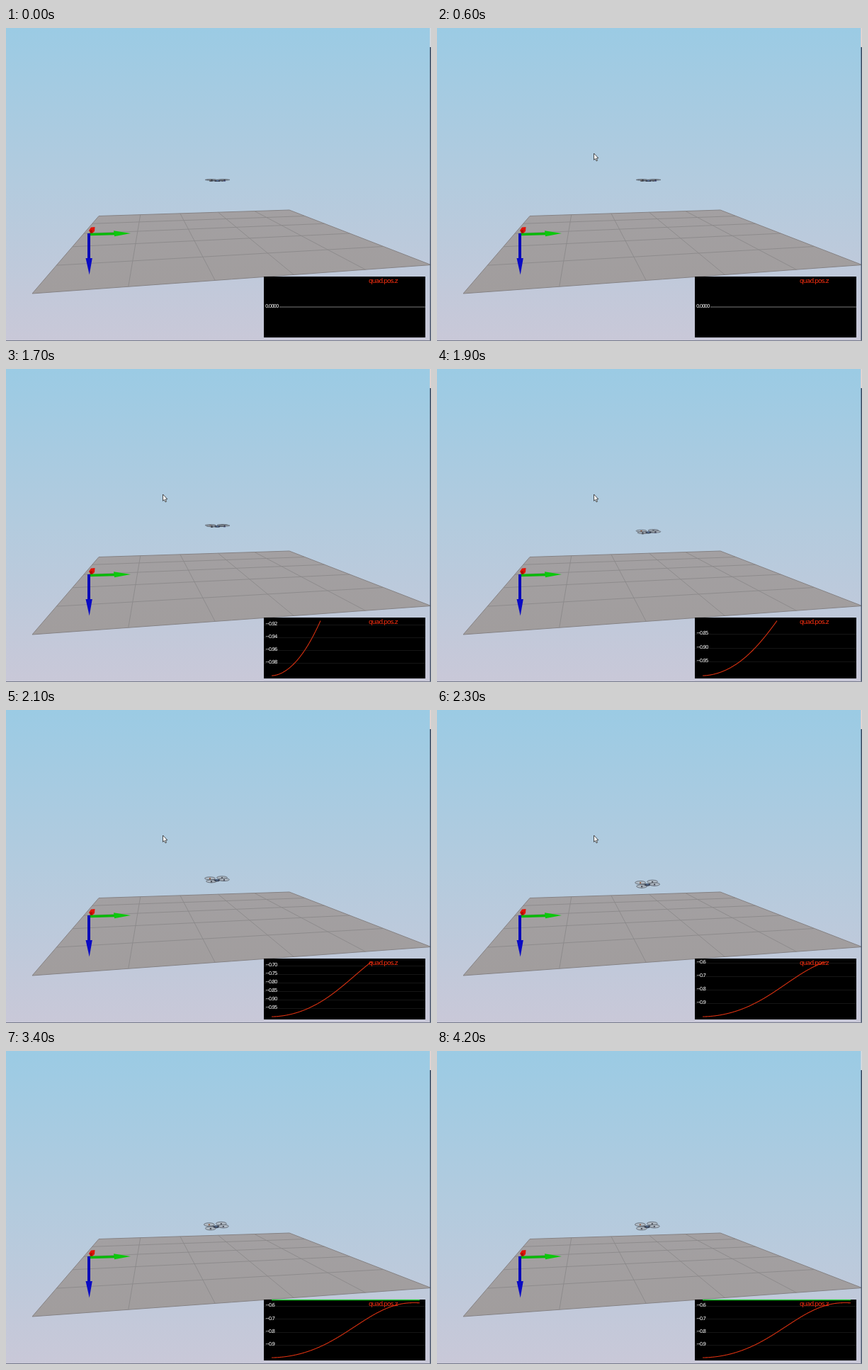
Animation, 600 px wide and 442 px high, one loop 4300 ms. Source, as an HTML page with a canvas:

```html
<!DOCTYPE html>
<html lang="en">
<head>
<meta charset="utf-8">
<title>Quadrotor altitude</title>
<style>
html, body { margin: 0; width: 100%; height: 100%; overflow: hidden; }
canvas { display: block; width: 600px; height: 442px; }
</style>
</head>
<body>
<canvas id="stage" width="600" height="442"></canvas>
<script>
const ctx = document.getElementById('stage').getContext('2d');
const LOOP = 4300;
const PLOT = { x: 364, y: 351, w: 228, h: 86, left: 375, base: 433, peak: 355.5 };
const TOP_RISE = 0.4266;

function poly(points, fill, stroke, width = 1) {
  ctx.beginPath();
  points.forEach(([x, y]) => ctx.lineTo(x, y));
  ctx.closePath();
  if (fill) { ctx.fillStyle = fill; ctx.fill(); }
  if (stroke) { ctx.strokeStyle = stroke; ctx.lineWidth = width; ctx.stroke(); }
}

function line(points, color, width = 1) {
  ctx.beginPath();
  points.forEach(([x, y]) => ctx.lineTo(x, y));
  ctx.strokeStyle = color;
  ctx.lineWidth = width;
  ctx.stroke();
}

function rect(x, y, w, h, fill) {
  ctx.fillStyle = fill;
  ctx.fillRect(x, y, w, h);
}

function oval(x, y, rx, ry, fill, stroke) {
  ctx.beginPath();
  ctx.ellipse(x, y, rx, ry, 0, 0, Math.PI * 2);
  ctx.fillStyle = fill;
  ctx.fill();
  if (stroke) { ctx.strokeStyle = stroke; ctx.lineWidth = 0.8; ctx.stroke(); }
}

function text(str, x, y, size, spacing, color) {
  ctx.font = `${size}px "DejaVu Sans", sans-serif`;
  ctx.letterSpacing = spacing + 'px';
  ctx.textBaseline = 'alphabetic';
  ctx.fillStyle = color;
  ctx.fillText(str, x, y);
}

function fade(y0, y1, ...colors) {
  const g = ctx.createLinearGradient(0, y0, 0, y1);
  colors.forEach((c, i) => g.addColorStop(i / (colors.length - 1), c));
  return g;
}

// Perspective map of the unit square onto the floor
function floorPoint(u, v) {
  const corners = [[131, 265.5, 1], [400, 257, 1.118], [600, 334.5, 0.554], [37, 375, 0.436]];
  const share = [(1 - u) * (1 - v), u * (1 - v), u * v, (1 - u) * v];
  let x = 0, y = 0, sum = 0;
  corners.forEach(([cx, cy, w], i) => {
    const k = w * share[i];
    x += cx * k;
    y += cy * k;
    sum += k;
  });
  return [x / sum, y / sum];
}

function drawScene() {
  rect(0, 0, 600, 442, fade(0, 442, '#9bcbe4', '#b3cbde', '#c9c8d8'));
  const floor = [[0, 0], [1, 0], [1, 1], [0, 1]].map(p => floorPoint(...p));
  poly(floor, fade(257, 375, '#a3a0a2', '#a19d9d'), '#858284');
  for (let i = 1; i < 5; i++) {
    line([floorPoint(i / 5, 0), floorPoint(i / 5, 1)], '#8c898b', 0.9);
    line([floorPoint(0, i / 5), floorPoint(1, i / 5)], '#8c898b', 0.9);
  }
}

function drawAxes() {
  poly([[117, 286], [120, 281.5], [125.5, 281], [125, 287], [121, 291]], '#e01408');
  poly([[118, 286], [122, 285], [122, 290], [119, 290]], '#b00c06');
  line([[117, 291.5], [154, 290.5]], '#08b808', 3.4);
  poly([[152, 286.3], [176, 290], [153, 294.3]], '#0cc80c');
  line([[117, 290], [117, 327]], '#0808b8', 4);
  poly([[112.5, 325], [121.8, 325], [117.7, 348.5]], '#0a0ac4');
}

function drawDrone(rise) {
  const k = rise / TOP_RISE;
  const cx = 298.5 - 1.7 * k ** 4;
  const cy = 215 + 76 * rise;
  const rotors = [[-10, -2.2], [7, -3.6], [-8, 3.2], [10, 0.2]]
    .map(([dx, dy]) => [cx + dx, cy + dy * k - 0.6 * (1 - k)]);
  rotors.forEach(([x, y]) => line([[cx, cy + 0.8], [x, y + 1]], '#4a505c', 1.3));
  rotors.forEach(([x, y], i) => {
    rect(x - 1.3, y + 0.2, 2.6, 2, i === 3 ? '#30306c' : '#30343c');
    oval(x, y, 7.4, 0.6 + 1.8 * k, 'rgba(176,184,192,.8)', '#5a616b');
    rect(x - 1, y - 0.6, 2, 1.6, i ? '#3a3e48' : '#8a5030');
  });
  oval(cx, cy + 0.9, 4, 1.2 + k * 0.8, '#3c4454');
  rect(cx - 1.5, cy, 3, 1.2, '#5574a0');
}

function riseAt(x) {
  const u = (x - PLOT.left) / 201;
  const w = u * (1 - 0.56 * u ** 0.55 * (1 - u) ** 2);
  return TOP_RISE * Math.sin(Math.PI / 2 * w) ** 2;
}

// Right end of the plotted curve at each tick of 100 ms
function traceEnd(n) {
  if (n < 14) return PLOT.left;
  if (n < 17) return 386 + 58 / 3 * (n - 14);
  if (n < 21) return 444 + 18 * (n - 17);
  return Math.min(584, 516 + 17 * (n - 21));
}

function tickStep(range) {
  for (let e = -5; e < 1; e++) {
    for (const m of [1, 2, 5]) {
      if (range / (m * 10 ** e) <= 7) return { step: m * 10 ** e, digits: -e };
    }
  }
}

function drawPlot(end) {
  const { x, y, w, h, left, base, peak } = PLOT;
  rect(x, y, w, h, '#000');
  ctx.save();
  ctx.beginPath();
  ctx.rect(x, y - 0.5, w, h);
  ctx.clip();
  if (end === left) {
    line([[386, 394], [x + w, 394]], '#7c7c7c');
    text('0.0000', 366, 394.7, 7, -1, '#fff');
  } else {
    const points = [];
    for (let px = left; px < end; px += 0.5) points.push([px, riseAt(px)]);
    points.push([end, riseAt(end)]);
    const max = Math.max(...points.map(p => p[1]));
    const scale = (base - peak) / max;
    const { step, digits } = tickStep(max);
    for (let i = 1; i * step <= max; i++) {
      const ty = base - i * step * scale;
      line([[x, Math.round(ty) + 0.5], [x + w, Math.round(ty) + 0.5]], '#151515');
      text('\u2212' + (1 - i * step).toFixed(digits), 366, ty + 1.1, 7, -1, '#fff');
    }
    const goal = base - 0.449 * scale;
    line([[left, goal], [end, goal]], '#18c828', 1.4);
    line(points.map(([px, r]) => [px, base - r * scale]), '#d63010', 1.1);
  }
  text('quad.pos.z', 512, 360, 9, -0.85, '#ff3010');
  ctx.restore();
}

function drawEdges(active) {
  rect(598.5, 0, 1.5, 27, active ? '#eed6d0' : '#dcdce0');
  rect(598.5, 27, 1.5, 415, fade(27, 442, '#34425a', '#58657c', '#4a566c'));
  rect(0, 441, 600, 1, '#777b8c');
}

function cursorAt(n) {
  if (n < 4 || n > 33) return null;
  if (n === 4) return [110, 213];
  if (n === 5) return [176, 192];
  return n === 33 ? [107, 208] : [221.5, 177];
}

function drawCursor(pos) {
  if (!pos) return;
  const shape = [[0, 0], [0, 9.3], [2, 7.4], [3.5, 10.8], [5, 10.1], [3.6, 6.9], [6.3, 6.7]];
  poly(shape.map(([x, y]) => [pos[0] + x, pos[1] + y]), '#fff', '#222', 0.8);
}

function draw(time) {
  const n = Math.floor((time % LOOP) / 100);
  const end = traceEnd(n);
  drawScene();
  drawAxes();
  drawDrone(riseAt(end));
  drawPlot(end);
  drawEdges(n >= 4 && n < 42);
  drawCursor(cursorAt(n));
}

const start = performance.now();
function frame() {
  draw(performance.now() - start);
  requestAnimationFrame(frame);
}
frame();
</script>
</body>
</html>
```
